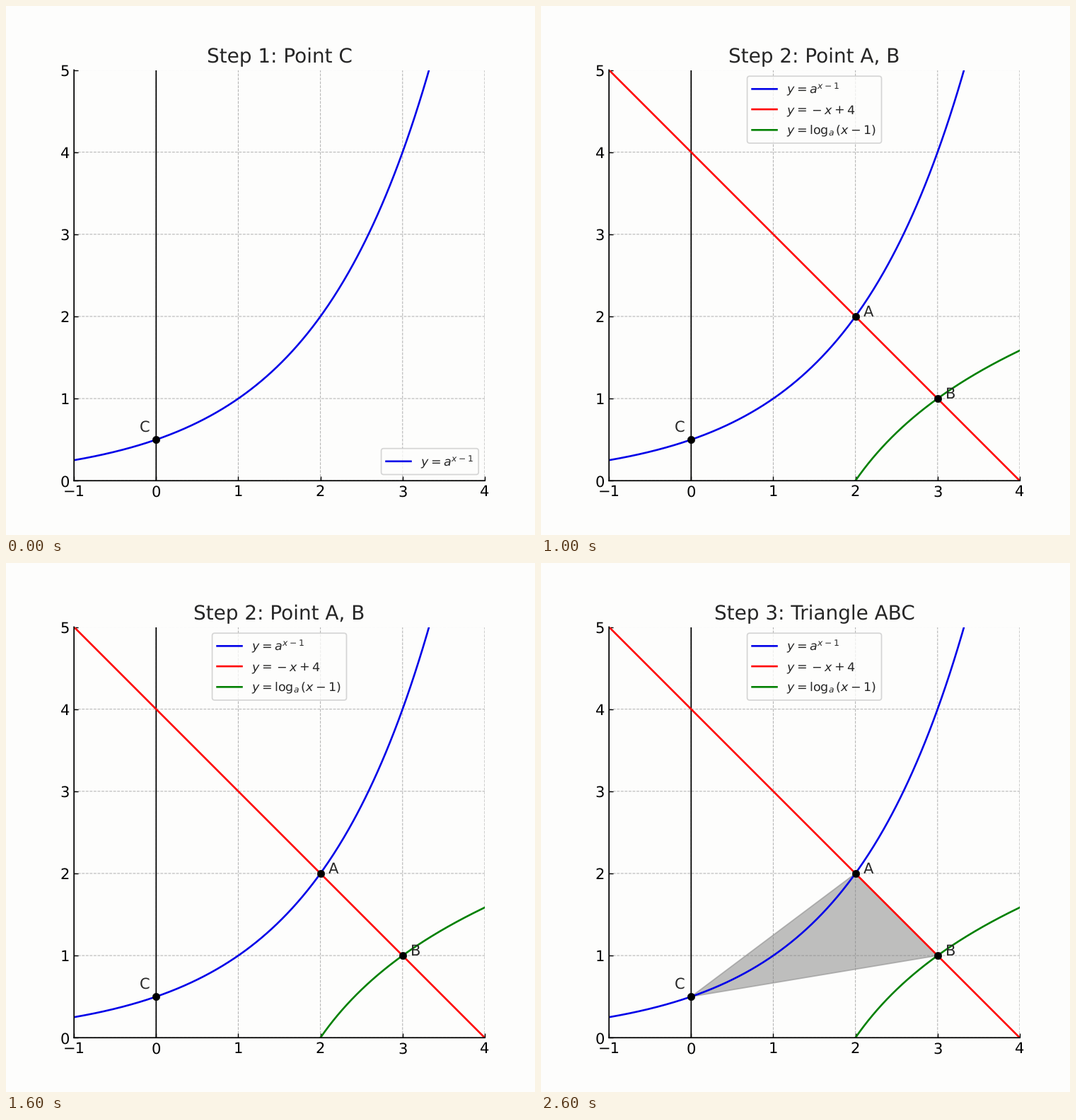
These frames come from a looping animation (748 px wide and 748 px high, 3 s). A matplotlib script:

```python
import numpy as np
import matplotlib.pyplot as plt
from matplotlib.animation import FuncAnimation

SIZE, DPI = 748, 125.7
SHEET = 6 * DPI  # full page; its right and bottom edges run off the stage
PAPER, INK = "#fdfdfc", "#262626"

plt.rcParams.update({
    "font.family": "DejaVu Sans",
    "font.size": 12,
    "text.color": INK,
    "text.hinting": "none",
    "path.snap": False,
    "figure.facecolor": PAPER,
    "axes.facecolor": PAPER,
    "legend.fontsize": 10,
    "legend.edgecolor": "0.8",
})

side = SIZE / DPI + 1e-6  # keeps rounding from losing a pixel
fig = plt.figure(figsize=(side, side), dpi=DPI)
left, top, span = 0.1275 * SHEET, 0.12 * SHEET, 0.77 * SHEET
ax = fig.add_axes([left / SIZE, 1 - (top + span) / SIZE,
                   span / SIZE, span / SIZE])
ax.set(xlim=(-1, 4), ylim=(0, 5), xticks=range(-1, 5), yticks=range(6))
ax.set_axisbelow(True)
ax.grid(color="#b4b4b4", linestyle="--", linewidth=0.6)
ax.tick_params(direction="in", length=3.5, width=0.8, labelsize=12)
ax.spines[["top", "right"]].set_visible(False)
ax.spines[["left", "bottom"]].set_linewidth(1)
title = ax.set_title("", fontsize=16, color=INK)


def curve(x, y, color, label):
    return ax.plot(x, y, color=color, lw=1.5, label=label)[0]


def point(x, y, name, dx, dy):
    dot, = ax.plot(x, y, "o", color="black", ms=6, mew=0.3, zorder=3)
    return [dot, ax.text(x + dx, y + dy, name, fontsize=12)]


def legend(lines, loc):
    box = ax.legend(handles=lines, loc=loc)
    box.remove()
    return ax.add_artist(box)


x = np.linspace(-1, 4, 400)
x_log = np.linspace(1.01, 4, 400)
exp_line = curve(x, 2 ** (x - 1), "#0000e8", r"$y=a^{x-1}$")
ax.axvline(0, color="black", lw=1)
point(0, 0.5, "C", -0.2, 0.1)

straight = curve(x, 4 - x, "red", r"$y=-x+4$")
log_line = curve(x_log, np.log2(x_log - 1), "green", r"$y=\log_a(x-1)$")
crossings = point(2, 2, "A", 0.1, 0) + point(3, 1, "B", 0.1, 0)
triangle = ax.fill([2, 3, 0], [2, 1, 0.5], color="gray", alpha=0.5)

small_key = legend([exp_line], "lower right")
full_key = legend([exp_line, straight, log_line], "upper center")

TITLES = ["Step 1: Point C", "Step 2: Point A, B", "Step 3: Triangle ABC"]
# Artists paired with the first and last step that shows them.
STAGES = [
    ([small_key], 0, 0),
    ([straight, log_line, full_key] + crossings, 1, 2),
    (triangle, 2, 2),
]


def show(step):
    title.set_text(TITLES[step])
    for artists, first, last in STAGES:
        for artist in artists:
            artist.set_visible(first <= step <= last)


anim = FuncAnimation(fig, show, frames=3, interval=1000,
                     init_func=lambda: show(0), repeat=True, repeat_delay=0)
plt.show()
```
